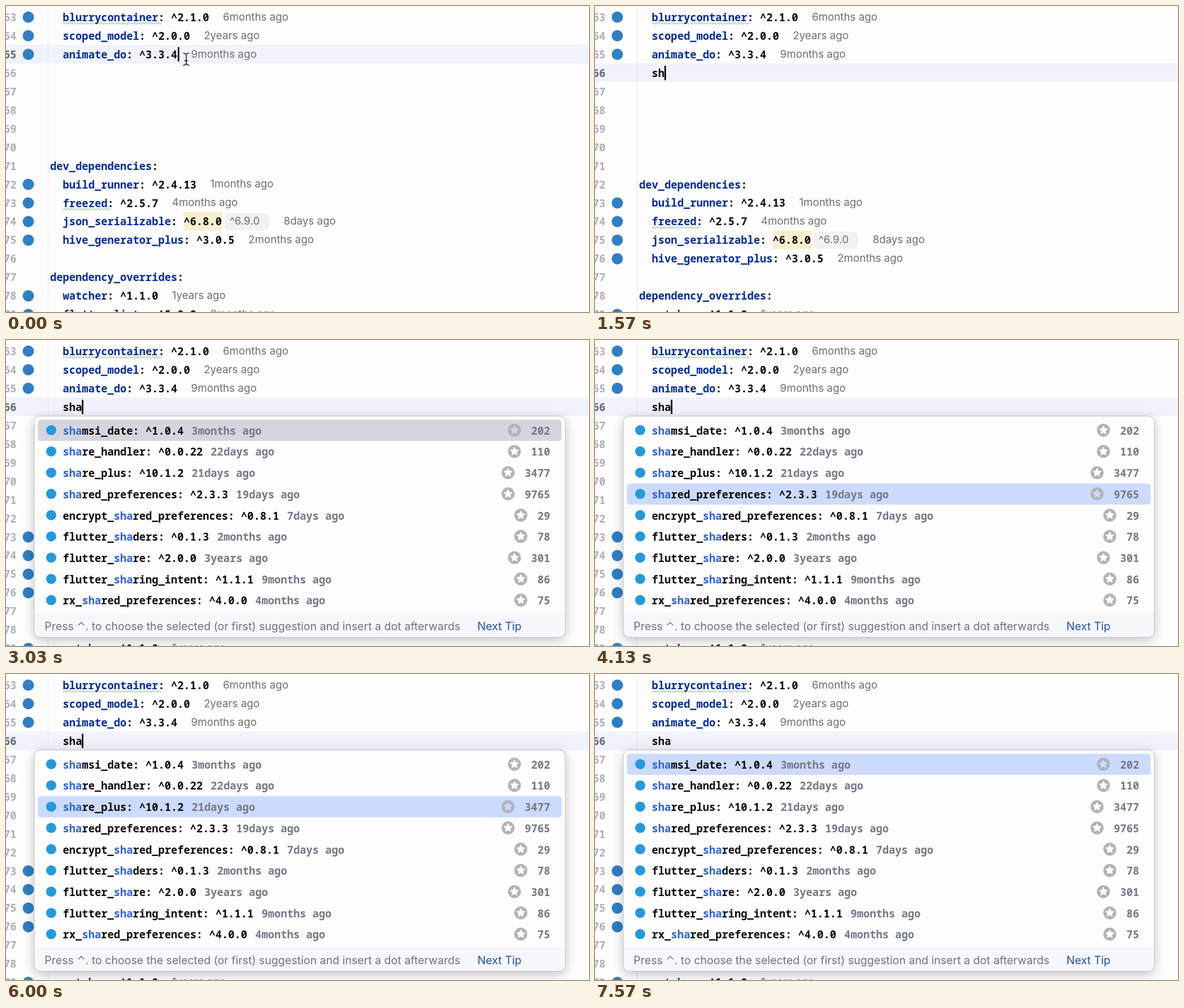
These frames come from a looping animation (1032 by 543 pixels, 7610 ms). An HTML page:

```html
<!DOCTYPE html>
<html lang="en">
<head>
<meta charset="utf-8">
<title>Dependency completion</title>
<style>
  html, body { margin: 0; width: 100%; height: 100%; overflow: hidden; background: #fdfdfd; }
  svg { display: block; width: 1032px; height: 543px; }
  text { white-space: pre; font-optical-sizing: none; }
  .code { font: 700 18.78px "Noto Sans Mono", "DejaVu Sans Mono", monospace; fill: #0b0b0d; }
  .key { fill: #032c9c; }
  .num { fill: #adb0bb; text-anchor: end; }
  .now { fill: #6b6f7e; }
  .note { font: 400 18.75px Inter, "Open Sans", sans-serif; fill: #6f6f6f; }
  .match { fill: #2f62dc; }
  .age { fill: #757988; }
  .count { fill: #757988; text-anchor: end; }
  .tip { font: 400 19.57px Inter, "Open Sans", sans-serif; fill: #70737d; }
  .link { fill: #2350b4; }
  .wave { fill: none; stroke: #a3cba0; stroke-width: 1.2; }

  .anim { animation: 7610ms step-end infinite; }
  #pointer, #oldNum { animation-name: until-enter; }
  #newNum { animation-name: from-enter; }
  #band, #below { animation-name: drop; }
  #caret { animation-name: caret; }
  #blink { animation-name: blink; }
  #k0 { animation-name: key-s; }
  #k1 { animation-name: key-h; }
  #k2 { animation-name: key-a; }
  #popup { animation-name: open; }
  #select { animation-name: select; }

  @keyframes until-enter { 0% { visibility: visible } 7.884%, 100% { visibility: hidden } }
  @keyframes from-enter { 0% { visibility: hidden } 7.884%, 100% { visibility: visible } }
  @keyframes drop { 0% { transform: none } 7.884%, 100% { transform: translateY(32.97px) } }
  @keyframes caret {
    0% { transform: translate(304px, 73px) }
    7.884% { transform: translate(100.4px, 106px) }
    15.112% { transform: translate(111.6px, 106px) }
    17.74% { transform: translate(122.9px, 106px) }
    24.31%, 100% { transform: translate(134.2px, 106px) }
  }
  @keyframes blink {
    0%, 24.31%, 37.45%, 50.59%, 63.73%, 76.87%, 90.01% { opacity: 1 }
    30.88%, 44.02%, 57.16%, 70.3%, 83.44%, 96.58%, 100% { opacity: 0 }
  }
  @keyframes key-s { 0% { visibility: hidden } 15.112%, 100% { visibility: visible } }
  @keyframes key-h { 0% { visibility: hidden } 17.74%, 100% { visibility: visible } }
  @keyframes key-a { 0% { visibility: hidden } 24.31%, 100% { visibility: visible } }
  @keyframes open { 0% { visibility: hidden } 32.852%, 100% { visibility: visible } }
  @keyframes select {
    0% { transform: none; fill: #d5d6dd }
    42.05% { transform: translateY(37.7px); fill: #ccdbfd }
    46.65% { transform: translateY(75.4px); fill: #ccdbfd }
    51.25% { transform: translateY(113.1px); fill: #ccdbfd }
    56.5% { transform: translateY(150.8px); fill: #ccdbfd }
    61.76% { transform: translateY(188.5px); fill: #ccdbfd }
    67.02% { transform: translateY(150.8px); fill: #ccdbfd }
    72.27% { transform: translateY(113.1px); fill: #ccdbfd }
    77.53% { transform: translateY(75.4px); fill: #ccdbfd }
    84.1% { transform: translateY(37.7px); fill: #ccdbfd }
    90.67%, 100% { transform: none; fill: #ccdbfd }
  }
</style>
</head>
<body>
<svg viewBox="0 0 1032 543">
  <defs>
    <filter id="shade" x="-10%" y="-10%" width="120%" height="125%">
      <feDropShadow dx="0" dy="5" stdDeviation="10" flood-color="#000" flood-opacity=".24"/>
    </filter>
    <path id="star" fill="#b2b3b7" fill-rule="evenodd"/>
    <path id="beam" d="M314 83.5Q318.5 83.5 319 87Q319.5 83.5 324 83.5M319 87V102M314 105Q318.5 105 319 101.5Q319.5 105 324 105M316 97H322"/>
  </defs>
  <rect width="1032" height="543" fill="#fdfdfd"/>
  <rect id="band" class="anim" y="69" width="1032" height="33" fill="#f0f3fb"/>
  <path d="M74.5 0V543" stroke="#e6e7eb"/>
  <g id="numbers"></g>
  <g id="above"></g>
  <g id="below" class="anim"></g>
  <g id="typed"></g>
  <g id="blink" class="anim"><rect id="caret" class="anim" width="2.7" height="25.5" fill="#000"/></g>
  <g id="pointer" class="anim" fill="none" stroke-linecap="round">
    <use href="#beam" stroke="#fff" stroke-width="4"/>
    <use href="#beam" stroke="#222" stroke-width="1.7"/>
  </g>
  <g id="popup" class="anim">
    <rect x="50" y="135" width="940" height="392.5" rx="11" fill="#fdfdfd" filter="url(#shade)"/>
    <path d="M50 485H990V516.5a11 11 0 0 1-11 11H61a11 11 0 0 1-11-11Z" fill="#f6f7fa"/>
    <rect x="50" y="135" width="940" height="392.5" rx="11" fill="none" stroke="#bfc0c5"/>
    <rect id="select" class="anim" x="56.5" y="141.5" width="927" height="37.6" rx="5"/>
    <g id="items"></g>
    <text class="tip" x="68.3" y="514.5">Press ⌃. to choose the selected (or first) suggestion and insert a dot afterwards</text>
    <text class="tip link" x="834.5" y="514.5">Next Tip</text>
  </g>
</svg>
<script>
  const CELL = 11.268, LEFT = 100.6, LINE = 32.97, ROW = 37.7;
  const put = (id, html) => { document.getElementById(id).innerHTML = html; };
  const text = (cls, x, y, body, extra = '') =>
    `<text class="${cls}" x="${x}" y="${y}" ${extra}>${body}</text>`;
  const base = i => 26.8 + LINE * i;

  function wave(x, y, width) {
    let d = `M${x} ${y}`;
    for (let dx = 0; dx < width; dx += 6) d += 'l3 -3l3 3';
    return `<path class="wave" d="${d}"/>`;
  }

  // One pubspec line: package, version, age, and an optional newer version.
  function entry(i, name, version, age, { wavy, newer } = {}) {
    const y = base(i);
    const start = LEFT + (name.length + 2) * CELL;
    const end = start + version.length * CELL;
    let out = `<circle cx="39.5" cy="${y - 7}" r="10" fill="#2f7fc4"/>`;
    if (newer) {
      out += `<rect x="${start - .5}" y="${y - 24}" width="69" height="33" fill="#f7efcd"/>
        <rect x="387" y="${y - 22}" width="78.5" height="30" rx="7" fill="#f1f1f2"/>`;
      out += text('note', 396, y - 1.2, newer);
    }
    if (wavy) out += wave(LEFT, y + 5.5, name.length * CELL);
    return out
      + text('code', LEFT, y, `<tspan class="key">${name}</tspan>: ${version}`)
      + text('note', newer ? 491.5 : end + 24.2, y - 1.2, age);
  }
  const section = (i, name) =>
    text('code', LEFT - 2 * CELL, base(i), `<tspan class="key">${name}</tspan>:`);

  let numbers = '';
  for (let i = 0; i < 17; i++) numbers += text('code num', 18.4, base(i), 63 + i);
  numbers += text('code num now anim', 18.4, base(2), 65, 'id="oldNum"');
  numbers += text('code num now anim', 18.4, base(3), 66, 'id="newNum"');
  put('numbers', numbers);

  put('above',
    entry(0, 'blurrycontainer', '^2.1.0', '6months ago', { wavy: true })
    + entry(1, 'scoped_model', '^2.0.0', '2years ago')
    + entry(2, 'animate_do', '^3.3.4', '9months ago'));

  put('below',
    section(8, 'dev_dependencies')
    + entry(9, 'build_runner', '^2.4.13', '1months ago')
    + entry(10, 'freezed', '^2.5.7', '4months ago', { wavy: true })
    + entry(11, 'json_serializable', '^6.8.0', '8days ago', { newer: '^6.9.0' })
    + entry(12, 'hive_generator_plus', '^3.0.5', '2months ago')
    + section(14, 'dependency_overrides')
    + entry(15, 'watcher', '^1.1.0', '1years ago')
    + entry(16, 'flutter_lints', '^5.0.0', '2months ago'));

  put('typed', [...'sha'].map((c, i) =>
    text('code anim', LEFT + i * CELL, base(3), c, `id="k${i}"`)).join(''));

  // A disc with a star cut out, so the row colour shows through.
  let star = 'M-11.5 0a11.5 11.5 0 1 0 23 0a11.5 11.5 0 1 0-23 0Z';
  for (let i = 0; i < 10; i++) {
    const a = i * Math.PI / 5, r = i % 2 ? 4.4 : 8.6;
    star += `${i ? 'L' : 'M'}${(r * Math.sin(a)).toFixed(2)} ${(-r * Math.cos(a)).toFixed(2)}`;
  }
  document.getElementById('star').setAttribute('d', star + 'Z');

  const items = [
    ['shamsi_date: ^1.0.4', '3months', 202],
    ['share_handler: ^0.0.22', '22days', 110],
    ['share_plus: ^10.1.2', '21days', 3477],
    ['shared_preferences: ^2.3.3', '19days', 9765],
    ['encrypt_shared_preferences: ^0.8.1', '7days', 29],
    ['flutter_shaders: ^0.1.3', '2months', 78],
    ['flutter_share: ^2.0.0', '3years', 301],
    ['flutter_sharing_intent: ^1.1.1', '9months', 86],
    ['rx_shared_preferences: ^4.0.0', '4months', 75]
  ];
  put('items', items.map(([label, age, likes], i) => {
    const mid = 160.5 + ROW * i, y = mid + 7.2;
    const starX = 933.8 - String(likes).length * CELL;
    return `<circle cx="80" cy="${mid - .5}" r="9" fill="#2499dc"/>`
      + text('code', LEFT, y, label.replace('sha', '<tspan class="match">sha</tspan>'))
      + text('code age', LEFT + (label.length + 1) * CELL + 2.6, y, age + ' ago')
      + `<use href="#star" x="${starX}" y="${mid - .5}"/>`
      + text('code count', 963.3, y, likes);
  }).join(''));
</script>
</body>
</html>
```
